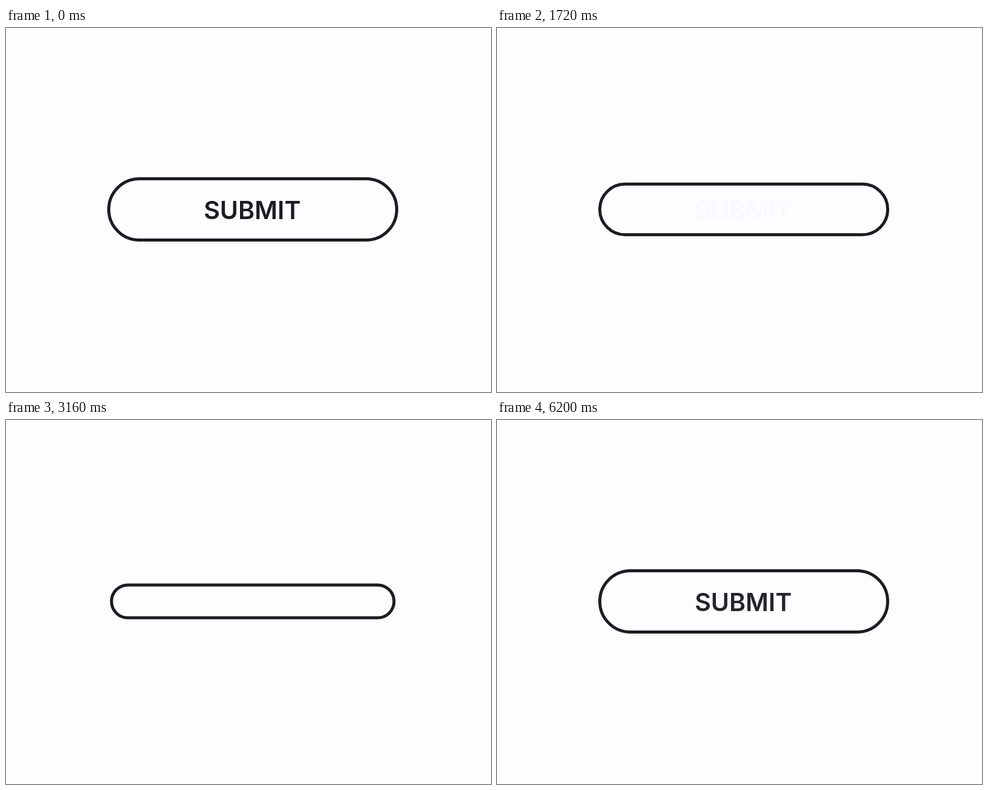
An HTML page with a canvas for the animation above (6.24 s loop, 800 by 600 pixels).

```html
<!DOCTYPE html>
<html lang="en">
<head>
<meta charset="utf-8">
<title>Submit button</title>
<style>
  html, body { margin: 0; width: 100%; height: 100%; overflow: hidden; background: #fdfcff; }
  canvas { display: block; }
</style>
</head>
<body>
<canvas id="stage" width="800" height="600"></canvas>
<script>
const ctx = document.getElementById('stage').getContext('2d');
const LOOP = 6240, STEP = 40;
const CX = 407, CY = 299;
const INK = '#1d1c20', PAPER = '#fdfcff';
const WIDE = 480, TALL = 106, SLIM = 58, LINE = 5;
const TRACK = { x: 179.5, w: 454.5, h: 33.5 };

const clamp = v => Math.min(1, Math.max(0, v));
const mix = (a, b, p) => a + (b - a) * p;
const linear = (t, from, to) => clamp((t - from) / (to - from));
const ease = (t, from, to) => {
  const x = linear(t, from, to);
  return x < 0.5 ? 4 * x ** 3 : 1 - 4 * (1 - x) ** 3;
};

function pill(x, y, w, h) {
  ctx.beginPath();
  ctx.roundRect(x, y, w, h, Math.min(w, h) / 2);
}

function drawFrame(w, h, tint) {
  pill(CX - (w - LINE) / 2, CY - (h - LINE) / 2, w - LINE, h - LINE);
  ctx.globalAlpha = tint;
  ctx.fillStyle = INK;
  ctx.fill();
  ctx.globalAlpha = 1;
  ctx.lineWidth = LINE;
  ctx.strokeStyle = INK;
  ctx.stroke();
}

function drawLabel(alpha) {
  if (alpha <= 0) return;
  ctx.globalAlpha = alpha;
  ctx.fillStyle = INK;
  ctx.font = '600 41px Inter, sans-serif';
  const m = ctx.measureText('SUBMIT');
  const x = 406.2 - (m.actualBoundingBoxRight - m.actualBoundingBoxLeft) / 2;
  ctx.fillText('SUBMIT', x, 315);
  ctx.globalAlpha = 1;
}

function drawProgress(w, alpha) {
  if (alpha <= 0) return;
  ctx.globalAlpha = alpha;
  ctx.fillStyle = INK;
  pill(TRACK.x, CY - TRACK.h / 2, w, TRACK.h);
  ctx.fill();
  ctx.globalAlpha = 1;
}

function drawCheck(part, alpha) {
  if (part <= 0 || alpha <= 0) return;
  const [ax, ay, bx, by, cx, cy] = [383.5, 299.7, 398, 314.2, 429.7, 282];
  const first = Math.hypot(bx - ax, by - ay);
  const second = Math.hypot(cx - bx, cy - by);
  const len = part * (first + second);
  const p = Math.min(1, len / first);
  const q = Math.max(0, len - first) / second;
  ctx.globalAlpha = alpha;
  ctx.strokeStyle = '#000';
  ctx.lineWidth = 7;
  ctx.beginPath();
  ctx.moveTo(ax, ay);
  ctx.lineTo(mix(ax, bx, p), mix(ay, by, p));
  if (q > 0) ctx.lineTo(mix(bx, cx, q), mix(by, cy, q));
  ctx.stroke();
  ctx.globalAlpha = 1;
}

function draw(t) {
  ctx.fillStyle = PAPER;
  ctx.fillRect(0, 0, 800, 600);

  const slim = ease(t, 1540, 1940);
  const round = ease(t, 3040, 3700);
  const open = ease(t, 5800, 6220);
  const press = 0.2 * (ease(t, 1090, 1330) - ease(t, 1360, 1600));

  drawFrame(
    mix(WIDE, TALL, round - open),
    mix(TALL, SLIM, slim - round),
    press
  );
  drawLabel(1 - ease(t, 1500, 1760) + linear(t, 6000, 6207));
  drawProgress(
    mix(TRACK.h, TRACK.w, ease(t, 1980, 2580)),
    linear(t, 1840, 1960) - ease(t, 2560, 2980)
  );
  drawCheck(linear(t, 3625, 3800), 1 - ease(t, 5800, 6120));
}

function tick() {
  const t = (performance.now() - start) % LOOP;
  draw(Math.floor((t + 1) / STEP) * STEP % LOOP);
  requestAnimationFrame(tick);
}

const start = performance.now();
tick();
</script>
</body>
</html>
```
